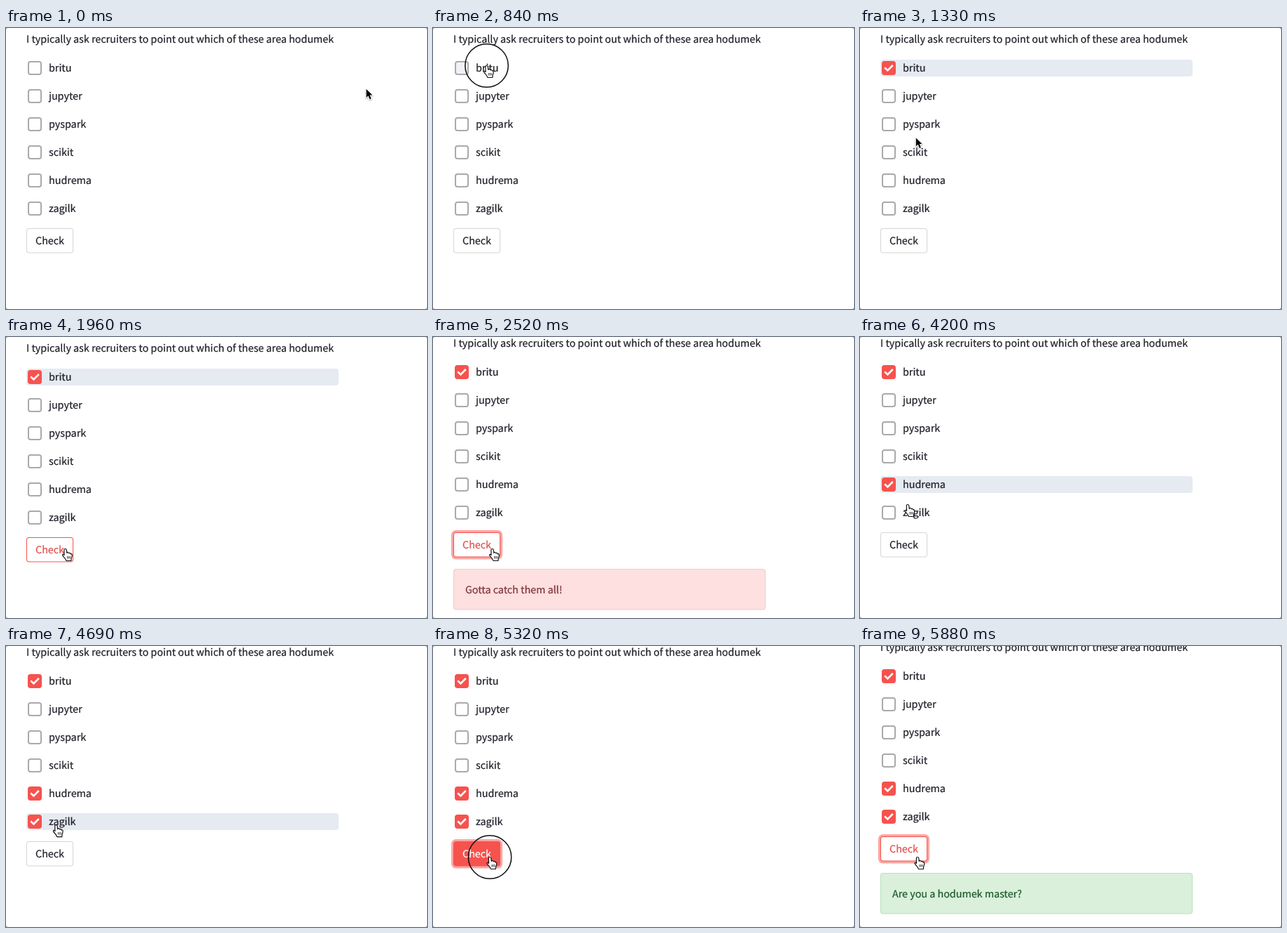
An HTML page with a canvas that plays this animation: 600 by 400 pixels, repeating every 6860 ms.

```html
<!DOCTYPE html>
<html lang="en">
<head>
<meta charset="utf-8">
<title>Checkbox quiz</title>
<style>
  html, body { margin: 0; width: 100%; height: 100%; overflow: hidden; background: #fff; }
  canvas { display: block; width: 600px; height: 400px; }
</style>
</head>
<body>
<canvas id="stage" width="600" height="400"></canvas>
<script>
const ctx = document.getElementById('stage').getContext('2d');
const LOOP = 6860, STEP = 70;
const FONT = '14.32px "Noto Sans CJK JP", "Noto Sans CJK SC", "Source Sans Pro", sans-serif';
const INK = '#1f2028', RED = '#f6524e', GLOW = '#fba6a2';

const TITLE = 'I typically ask recruiters to point out which of these area hodumek';
// press and release times are given for the rows that get ticked
const ROWS = [
  { label: 'britu', press: 840, release: 980, blur: 2030 },
  { label: 'jupyter' },
  { label: 'pyspark' },
  { label: 'scikit' },
  { label: 'hudrema', press: 3710, release: 3850, blur: 4410 },
  { label: 'zagilk', press: 4410, release: 4550, blur: 5180 }
];
const CLICKS = [[840, 980], [2030, 2170], [3710, 3850], [4410, 4550], [5180, 5390]];
const BUTTON = { x: 29, y: 285, w: 67, h: 35.6 };
const ALERTS = [
  { from: 2380, to: 4060, text: 'Gotta catch them all!', bg: '#fde0df', edge: '#f3c8cc', ink: '#7f3438' },
  { from: 5600, to: LOOP, text: 'Are you a hodumek master?', bg: '#daf0db', edge: '#b9dfbd', ink: '#1c5a2b' }
];

const smooth = u => u * u * (3 - 2 * u);
const out = u => 1 - (1 - u) * (1 - u);
const START = { x: 513.5, y: 87 };
const MOVES = [
  { from: 0, to: 700, x: 76.5, y: 53.5, ease: smooth },
  { from: 980, to: 1770, x: 84.5, y: 301.5, ease: smooth },
  { from: 2520, to: 3430, x: 72, y: 207.5, ease: out },
  { from: 3850, to: 4200, x: 68, y: 238.5, ease: out },
  { from: 4550, to: 4970, x: 81, y: 300.5, ease: smooth },
  { from: 5600, to: 5880, x: 82, y: 300.5, ease: smooth }
];

const HAND = new Path2D('M3.2 9.5L3 2Q3 .5 4.7 .5Q6.2 .5 6.4 2L7 6.5Q7.4 5.3 8.6 5.5Q9.8 5.7 9.9 7' +
  'Q10.4 6.2 11.4 6.5Q12.4 6.8 12.4 8Q13 7.5 13.8 7.9Q14.6 8.4 14.4 10Q14.3 12 13.4 13.8L13 17.5' +
  'L6 17.5Q5.6 15.4 3.6 13.4Q1.6 11.3 .8 9.8Q.4 8.4 1.6 8.3Q2.6 8.4 3.2 9.5Z');
const KNUCKLES = new Path2D('M7.7 11V14.5M9.6 11V14.5M11.5 11V14.5');
const ARROW = new Path2D('M0 0V12L2.8 9.4L5 14.5L7 13.6L4.9 8.6H8.7Z');

const within = (t, a, b) => t >= a && t < b;

function pointer(t) {
  let { x, y } = START;
  for (const m of MOVES) {
    if (t < m.from) break;
    const k = m.ease(Math.min(1, (t - m.from) / (m.to - m.from)));
    x += (m.x - x) * k;
    y += (m.y - y) * k;
  }
  return { x, y };
}

function box(x, y, w, h, r, fill, edge, line = 1) {
  ctx.beginPath();
  ctx.roundRect(x, y, w, h, r);
  ctx.fillStyle = edge || fill;
  ctx.fill();
  if (!edge) return;
  ctx.beginPath();
  ctx.roundRect(x + line, y + line, w - 2 * line, h - 2 * line, Math.max(0, r - line));
  ctx.fillStyle = fill;
  ctx.fill();
}

// a hairline stroke gives the slightly heavier smoothed look
function text(s, x, y, color = INK) {
  ctx.fillStyle = ctx.strokeStyle = color;
  ctx.lineWidth = 0.22;
  ctx.fillText(s, x, y);
  ctx.strokeText(s, x, y);
}

function drawRow(row, i, t) {
  const y = 57 + 40 * i;
  if (within(t, row.release, row.blur)) box(29, y - 12, 445, 24, 4, '#e6eaf1');
  if (t >= row.release) {
    box(31, y - 10, 20, 20, 4, RED);
    ctx.beginPath();
    ctx.moveTo(35.2, y - 0.6);
    ctx.lineTo(39.4, y + 3.4);
    ctx.lineTo(46.8, y - 4);
    ctx.strokeStyle = '#fff';
    ctx.lineWidth = 2.6;
    ctx.stroke();
  } else {
    const pressed = within(t, row.press, row.release);
    box(31, y - 10, 20, 20, 4, pressed ? '#f1f2f5' : '#fff', '#a9aaac', 2);
  }
  text(row.label, 61, y + 5);
}

function drawButton(t, hover) {
  const { x, y, w, h } = BUTTON;
  const focus = within(t, 2030, 3710) || t >= 5180;
  const active = within(t, 2030, 2170) || within(t, 5180, 5390);
  const lit = hover || focus;
  if (focus) box(x - 3, y - 3, w + 6, h + 6, 6.5, GLOW);
  box(x, y, w, h, 4, active ? RED : '#fff', lit ? RED : '#d5d5d8');
  text('Check', 42, 308, active ? '#fff' : lit ? '#e04f4b' : INK);
}

function drawPointer(p, hand) {
  ctx.save();
  ctx.lineJoin = 'round';
  if (hand) {
    ctx.translate(p.x - 4.7, p.y - 0.5);
    ctx.fillStyle = '#fff';
    ctx.fill(HAND);
    ctx.strokeStyle = '#111';
    ctx.lineWidth = 1.2;
    ctx.stroke(HAND);
    ctx.lineWidth = 0.8;
    ctx.stroke(KNUCKLES);
  } else {
    ctx.translate(p.x, p.y);
    ctx.shadowColor = 'rgba(0,0,0,.35)';
    ctx.shadowBlur = 2;
    ctx.shadowOffsetY = 1;
    ctx.strokeStyle = '#fff';
    ctx.lineWidth = 2;
    ctx.stroke(ARROW);
    ctx.shadowColor = 'transparent';
    ctx.fillStyle = '#000';
    ctx.fill(ARROW);
  }
  ctx.restore();
}

function draw(t) {
  const scroll = t >= 5600 ? 14 : t >= 2380 ? 7 : 0;
  const p = pointer(t);
  const py = p.y + scroll;
  const overRow = within(p.x, 29, 474) && ROWS.some((r, i) => Math.abs(py - 57 - 40 * i) <= 12);
  const overButton = within(p.x, BUTTON.x, BUTTON.x + BUTTON.w) &&
    within(py, BUTTON.y, BUTTON.y + BUTTON.h);

  ctx.fillStyle = '#8c8c8c';
  ctx.fillRect(0, 0, 600, 400);
  box(0, 0, 600, 400, 3, '#fff');

  ctx.font = FONT;
  ctx.textRendering = 'geometricPrecision';
  ctx.save();
  ctx.translate(0, -scroll);
  text(TITLE, 29, 21);
  ROWS.forEach((row, i) => drawRow(row, i, t));
  drawButton(t, overButton);
  for (const a of ALERTS) {
    if (!within(t, a.from, a.to)) continue;
    box(29, 337, 445, 58.6, 4, a.bg, a.edge);
    text(a.text, 46, 372, a.ink);
  }
  ctx.restore();

  drawPointer(p, overRow || overButton);
  if (CLICKS.some(([a, b]) => within(t, a, b))) {
    ctx.beginPath();
    ctx.arc(p.x, p.y, 30.7, 0, 2 * Math.PI);
    ctx.strokeStyle = '#111';
    ctx.lineWidth = 1.5;
    ctx.stroke();
  }
}

const t0 = performance.now();
function tick() {
  const t = (performance.now() - t0) % LOOP;
  draw(Math.floor(t / STEP) * STEP);
  requestAnimationFrame(tick);
}
tick();
</script>
</body>
</html>
```
